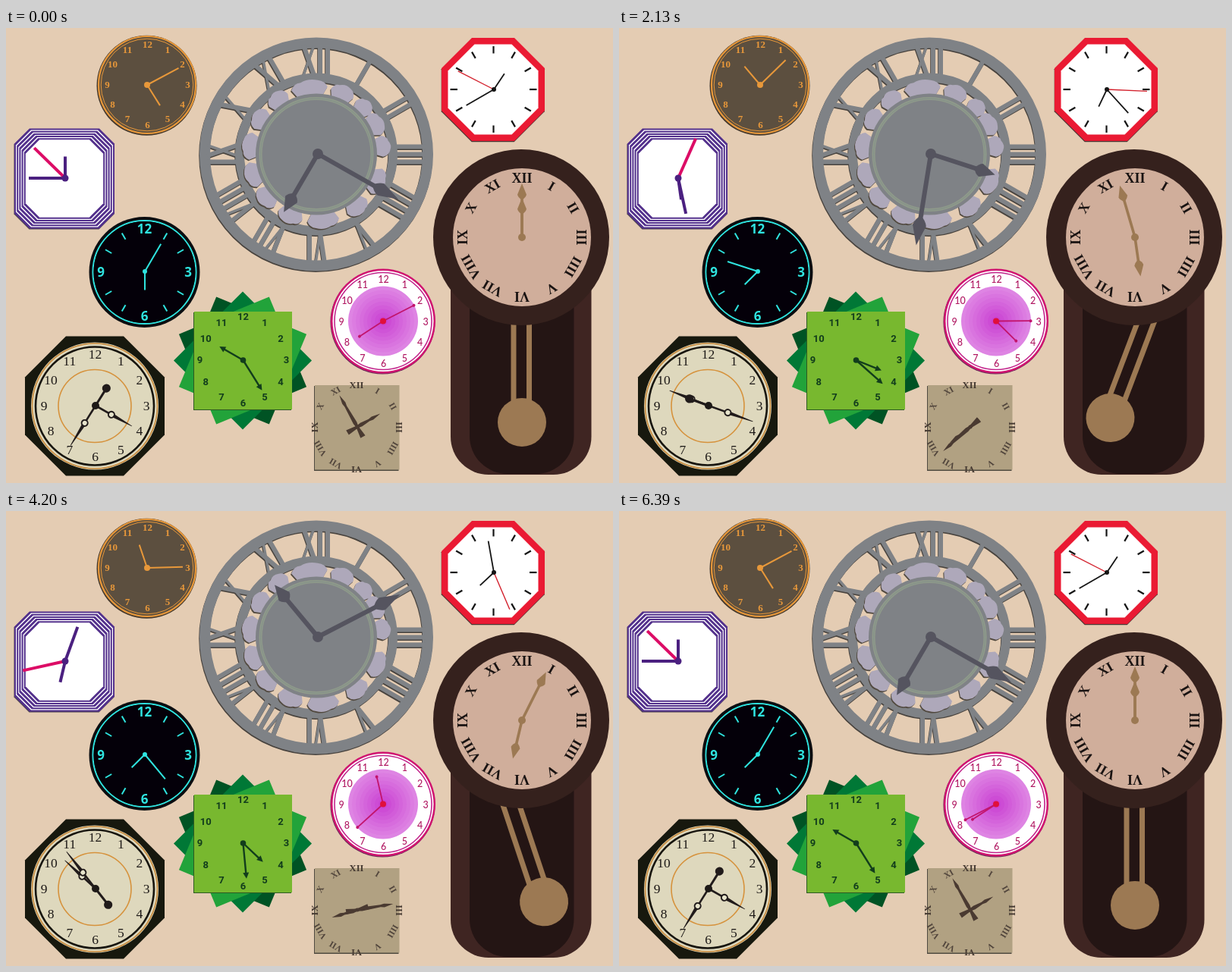
An HTML page with a canvas that plays this animation: 800x600 px, repeating every 6.42 s.

```html
<!DOCTYPE html>
<html lang="en">
<head>
<meta charset="utf-8">
<title>Wall of clocks</title>
<style>
html, body { margin: 0; width: 100%; height: 100%; overflow: hidden; background: #e4ccb3; }
canvas { display: block; }
</style>
</head>
<body>
<canvas id="stage" width="800" height="600"></canvas>
<script>
const ctx = document.getElementById('stage').getContext('2d');
const LOOP = 6420, SPIN = 6300, SWING = 1800, TAU = Math.PI * 2;
const ROMAN = 'XII I II III IIII V VI VII VIII IX X XI'.split(' ');
const ARABIC = [12, 1, 2, 3, 4, 5, 6, 7, 8, 9, 10, 11];
const rad = deg => deg * Math.PI / 180;

// Ease in and out along the curve (.42, 0, .58, 1)
function ease(x) {
  if (x <= 0) return 0;
  if (x >= 1) return 1;
  let lo = 0, hi = 1, s;
  for (let i = 0; i < 24; i++) {
    s = (lo + hi) / 2;
    const at = 1.26 * s * (1 - s) ** 2 + 1.74 * s * s * (1 - s) + s ** 3;
    if (at < x) lo = s; else hi = s;
  }
  return s * s * (3 - 2 * s);
}

function at(x, y, deg, draw) {
  ctx.save();
  ctx.translate(x, y);
  ctx.rotate(rad(deg));
  draw();
  ctx.restore();
}

function disc(x, y, r, color) {
  ctx.beginPath();
  ctx.arc(x, y, r, 0, TAU);
  ctx.fillStyle = color;
  ctx.fill();
}

function ring(x, y, r, width, color) {
  ctx.beginPath();
  ctx.arc(x, y, r, 0, TAU);
  ctx.lineWidth = width;
  ctx.strokeStyle = color;
  ctx.stroke();
}

function line(x1, y1, x2, y2, width, color) {
  ctx.beginPath();
  ctx.moveTo(x1, y1);
  ctx.lineTo(x2, y2);
  ctx.lineWidth = width;
  ctx.strokeStyle = color;
  ctx.stroke();
}

function poly(points, color) {
  ctx.beginPath();
  points.forEach(([x, y]) => ctx.lineTo(x, y));
  ctx.closePath();
  ctx.fillStyle = color;
  ctx.fill();
}

function octagon(x, y, half, cut, color) {
  const c = half - cut;
  poly([[-c, -half], [c, -half], [half, -c], [half, c], [c, half], [-c, half], [-half, c], [-half, -c]]
    .map(([px, py]) => [x + px, y + py]), color);
}

// Labels around a dial, upright or turned outwards
function dial(x, y, r, labels, font, color, turned) {
  ctx.font = font;
  ctx.fillStyle = color;
  ctx.textAlign = 'center';
  ctx.textBaseline = 'alphabetic';
  labels.forEach((label, i) => {
    const a = i * TAU / labels.length;
    const m = ctx.measureText(label);
    const drop = (m.actualBoundingBoxAscent - m.actualBoundingBoxDescent) / 2;
    at(x + r * Math.sin(a), y - r * Math.cos(a), turned ? i * 360 / labels.length : 0,
      () => ctx.fillText(label, 0, drop));
  });
}

function ticks(x, y, inner, outer, width, color, skip) {
  for (let i = 0; i < 12; i++) {
    if (skip && i % skip === 0) continue;
    at(x, y, i * 30, () => line(0, -inner, 0, -outer, width, color));
  }
}

// Hand styles, all pointing up from the origin
const bar = (len, width, color) => () => line(0, 0, 0, -len, width, color);

const spade = (len, head, half, width, color) => () => {
  line(0, 0, 0, -len + head * .6, width, color);
  ctx.beginPath();
  ctx.moveTo(0, -len);
  ctx.lineTo(half, -len + head * .78);
  ctx.quadraticCurveTo(half * .8, -len + head, 0, -len + head * 1.15);
  ctx.quadraticCurveTo(-half * .8, -len + head, -half, -len + head * .78);
  ctx.closePath();
  ctx.fillStyle = color;
  ctx.fill();
};

const arrow = (len, color) => () => {
  line(0, 0, 0, -len + 5, 2.4, color);
  poly([[0, -len], [4, -len + 8], [-4, -len + 8]], color);
};

const dotted = (len, color) => () => {
  line(0, 0, 0, -len, 1.8, color);
  disc(0, -len, 2, color);
};

const taper = (len, color) => () =>
  poly([[0, -len], [2.4, -len + 12], [1.5, -len + 17], [2.6, -6], [1.6, 0], [3.6, 15], [-3.6, 15], [-1.6, 0], [-2.6, -6], [-1.5, -len + 17], [-2.4, -len + 12]], color);

const looped = (len, eye, tail) => () => {
  const ink = '#211b1b';
  line(0, 0, 0, -eye, 2.6, ink);
  poly([[-2.2, -eye - 4], [2.2, -eye - 4], [.4, -len], [-.4, -len]], ink);
  disc(0, -eye, 4, '#e6e3cb');
  ring(0, -eye, 4, 2, ink);
  if (tail) {
    line(0, 0, 0, tail, 3, ink);
    disc(0, tail, 5.6, ink);
  }
};

// Each hand: style, start angle, whole turns over the spin
function hands(x, y, spin, list, hub, color) {
  list.forEach(([draw, start, turns]) => at(x, y, start + 360 * turns * spin, draw));
  disc(x, y, hub, color);
}

function brownClock(e) {
  const x = 186, y = 75, gold = '#e8983a';
  disc(x - .5, y + .8, 66, '#44382c');
  disc(x, y, 65, '#5c4f3f');
  ring(x, y, 64, 2.2, gold);
  ring(x, y, 60.8, 1, gold);
  dial(x + .5, y - .5, 53, ARABIC, 'bold 13px "Liberation Serif", serif', gold);
  hands(x, y, e, [[bar(32, 2, gold), 148, 2], [bar(47, 2, gold), 62, 4]], 4, gold);
}

function purpleClock(e) {
  const x = 77, y = 198.5, ink = '#4b2080';
  octagon(x - .5, y + 1, 66, 20, '#4a4150');
  for (let i = 0; i < 5; i++) {
    const inset = i * 3.2;
    octagon(x, y, 66 - inset, 20 - i * .4, '#53308c');
    octagon(x, y, 64 - inset, 20 - i * .4, '#fff');
  }
  hands(78, 198, e, [[bar(48, 4, ink), 270, 3], [bar(57, 4, '#dc0c66'), 314.3, 5], [bar(28.5, 4, ink), 0, 2]], 4.5, ink);
}

function cyanClock(e, t) {
  const x = 182.5, y = 322, glow = '#2fe4e0';
  disc(x, y, 73, '#0b0d10');
  ring(x, y, 68, 2, glow);
  disc(x, y, 67, '#040009');
  ticks(x, y, 50, 59.5, 2, glow, 3);
  dial(x, y - .5, 57.5, [12, 3, 6, 9], 'bold 17px "Open Sans", sans-serif', glow);
  const hour = 180 + 45 * ease(t / 900);
  hands(183, 321, e, [[bar(42, 2, glow), 30.3, 3], [bar(24.5, 2, glow), hour, 0]], 3, glow);
}

// Cut-out numerals between the two rings of the large clock
function numeral(text, color) {
  const width = { I: 10, V: 18, X: 20 };
  let x = -[...text].reduce((sum, c) => sum + width[c], 0) / 2;
  for (const c of text) {
    const w = width[c], l = x + 3, r = x + w - 3, mid = x + w / 2;
    if (c === 'I') line(mid, -104, mid, -144, 6, color);
    else if (c === 'V') {
      line(l, -144, mid, -104, 6, color);
      line(r, -144, mid, -104, 3.5, color);
    } else {
      line(l, -144, r, -104, 6, color);
      line(r, -144, l, -104, 3.5, color);
    }
    x += w;
  }
}

function frameOfRings(x, y, color) {
  ring(x, y, 147, 14, color);
  ring(x, y, 101, 12, color);
  ROMAN.forEach((text, i) => at(x, y, i * 30, () => numeral(text, color)));
}

function petals(x, y, color) {
  const spread = [354, 23, 45, 63, 83, 114, 142, 174, 203, 229, 252, 277, 302, 325];
  const halves = [24, 16, 13, 16, 14, 18, 16, 21, 17, 16, 17, 18, 15, 15];
  spread.forEach((deg, i) => at(x, y, deg, () => {
    const h = halves[i];
    ctx.beginPath();
    ctx.moveTo(-h * .6, -74);
    ctx.lineTo(-h, -87);
    ctx.quadraticCurveTo(-h * .85, -96, -h * .45, -96);
    ctx.quadraticCurveTo(0, -101, h * .5, -97);
    ctx.quadraticCurveTo(h * .9, -95, h, -87);
    ctx.lineTo(h * .6, -74);
    ctx.fillStyle = color;
    ctx.fill();
  }));
}

function bigClock(e) {
  const x = 409, y = 166.5, gray = '#7f8286', ink = '#55545f';
  frameOfRings(x - .8, y + 1.6, '#48433e');
  frameOfRings(x, y, gray);
  petals(x - 1, y + 1.6, '#51493f');
  petals(x, y, '#aea8ba');
  disc(x, y, 80, gray);
  ring(x, y, 73.5, 4, '#8f9a8a');
  ring(x, y, 73.5, 1, '#84908a');
  hands(411, 166, e, [[spade(89, 25, 9, 6, ink), 210.3, 3], [spade(122, 34, 9, 6, ink), 119.5, 5]], 7, ink);
}

function redClock(e) {
  const x = 642, y = 81, ink = '#151515', red = '#d3202c';
  octagon(x - .3, y + 1.3, 68, 40, '#4a3533');
  octagon(x, y, 68, 40, '#ea1a33');
  octagon(x, y, 59.5, 35, '#fff');
  ticks(x + .5, y, 47.5, 57, 2.2, ink);
  hands(643, 81, e, [[bar(25, 1.8, ink), 33.7, 2], [bar(42, 1.8, ink), 240, 3], [bar(53, 1.4, red), 297, 6]], 3, ink);
}

function pinkClock(e) {
  const x = 497, y = 386.5, ink = '#c2146c';
  disc(x - .6, y + 1, 69, '#6d2a58');
  disc(x, y, 69, '#d01470');
  disc(x, y, 66.5, '#fff');
  ring(x, y, 64, 1.6, '#c2268c');
  for (let i = 0; i < 9; i++) {
    disc(x, y, 46 - i * 5, `rgb(${222 - i * 2.5},${132 - i * 8},${227 - i * 2})`);
  }
  dial(x + .5, y, 55.5, ARABIC, '500 12.5px Lato, sans-serif', '#b01862');
  hands(497, 386.5, e, [[dotted(37, ink), 237, 3], [dotted(45.5, ink), 62.9, 4.5]], 4, '#e00f3c');
}

function greenClock(e) {
  const x = 312, y = 438.5, ink = '#123d1c';
  const fan = [['#005324', [112.5, 157.5]], ['#007836', [0, 90]], ['#22a33a', [22.5, 67.5]]];
  for (const [color, tips] of fan) {
    for (const deg of tips) {
      for (const turn of [0, 180]) {
        at(x, y, deg + turn, () => poly([[0, -91], [45, -46], [0, 0], [-45, -46]], color));
      }
    }
  }
  ctx.fillStyle = '#2d5a22';
  ctx.fillRect(x - 65, y - 63.5, 129, 129);
  ctx.fillStyle = '#78b82f';
  ctx.fillRect(x - 64, y - 64.5, 129, 129);
  dial(x + .5, y - 1, 57, ARABIC, 'bold condensed 13px Roboto, sans-serif', ink);
  hands(312.5, 438, e, [[arrow(36, ink), 300, 2], [arrow(47, ink), 148, 4]], 3.8, ink);
}

function creamClock(e) {
  const x = 117, y = 498.5, ink = '#1d1917';
  octagon(x, y, 92, 54, '#17180e');
  disc(x, y, 84, '#ded8bd');
  ring(x, y, 82.5, 1.6, '#c98b3d');
  ring(x, y, 78, 2.6, '#17150f');
  ring(x, y, 48, 1.6, '#d6923c');
  dial(x + .5, y - .5, 67.5, ARABIC, '17.5px "Liberation Serif", Tinos, serif', ink);
  hands(118, 498, e, [[looped(55, 24, 0), 119.4, 2], [looped(62, 27, 27), 212, 3]], 5, ink);
}

function tanClock(e) {
  const x = 462, y = 526.5, ink = '#4a3a31';
  ctx.fillStyle = '#4f4a40';
  ctx.fillRect(406, 472, 111.5, 112);
  ctx.fillStyle = '#b1a182';
  ctx.fillRect(407, 471, 111.5, 111.5);
  const pick = main => ROMAN.map((n, i) => (i % 3 === 0) === main ? n : '');
  dial(x, y, 55.5, pick(true), 'bold 12.5px "Liberation Serif", serif', '#463a32', true);
  dial(x, y, 55.5, pick(false), 'bold 11.5px "Liberation Serif", serif', '#50443b', true);
  hands(463, 526, e, [[taper(35, ink), 60, 2], [taper(48, ink), 330.5, 3]], 2.5, ink);
}

function roundBox(x, y, w, h, r, color) {
  ctx.beginPath();
  ctx.roundRect(x, y, w, h, [0, 0, r, r]);
  ctx.fillStyle = color;
  ctx.fill();
}

function swing(t) {
  const stops = [0, 24, -24, 0, 0];
  const i = Math.floor(t / SWING);
  return stops[i] + (stops[i + 1] - stops[i]) * ease(t / SWING - i);
}

function woodClock(e, t) {
  const x = 679, y = 276, brass = '#9c7953', wood = '#35211d';
  roundBox(586, 345, 185.5, 244, 50, '#3f2522');
  roundBox(611, 345, 137.5, 243, 50, '#241514');
  at(680, 428, swing(t), () => {
    line(-11, -62, -11, 70, 7, brass);
    line(9.5, -62, 9.5, 70, 7, brass);
    disc(0, 92, 32, brass);
  });
  disc(x, y, 116, wood);
  disc(680, y, 91, '#d0ae9b');
  dial(680, y, 78.5, ROMAN, 'bold 18px "Liberation Serif", serif', '#191312', true);
  hands(680, 276, e, [[spade(52, 19, 6, 3.6, brass), 0, 2], [spade(71, 19, 6, 3.6, brass), 0, 4]], 5, brass);
}

function frame(now) {
  const t = now % LOOP, e = ease(t / SPIN);
  ctx.fillStyle = '#e4ccb3';
  ctx.fillRect(0, 0, 800, 600);
  [brownClock, purpleClock, cyanClock, bigClock, redClock, pinkClock, greenClock, creamClock, tanClock, woodClock]
    .forEach(clock => clock(e, t));
  requestAnimationFrame(() => frame(performance.now() - began));
}
const began = performance.now();
frame(0);
</script>
</body>
</html>
```
